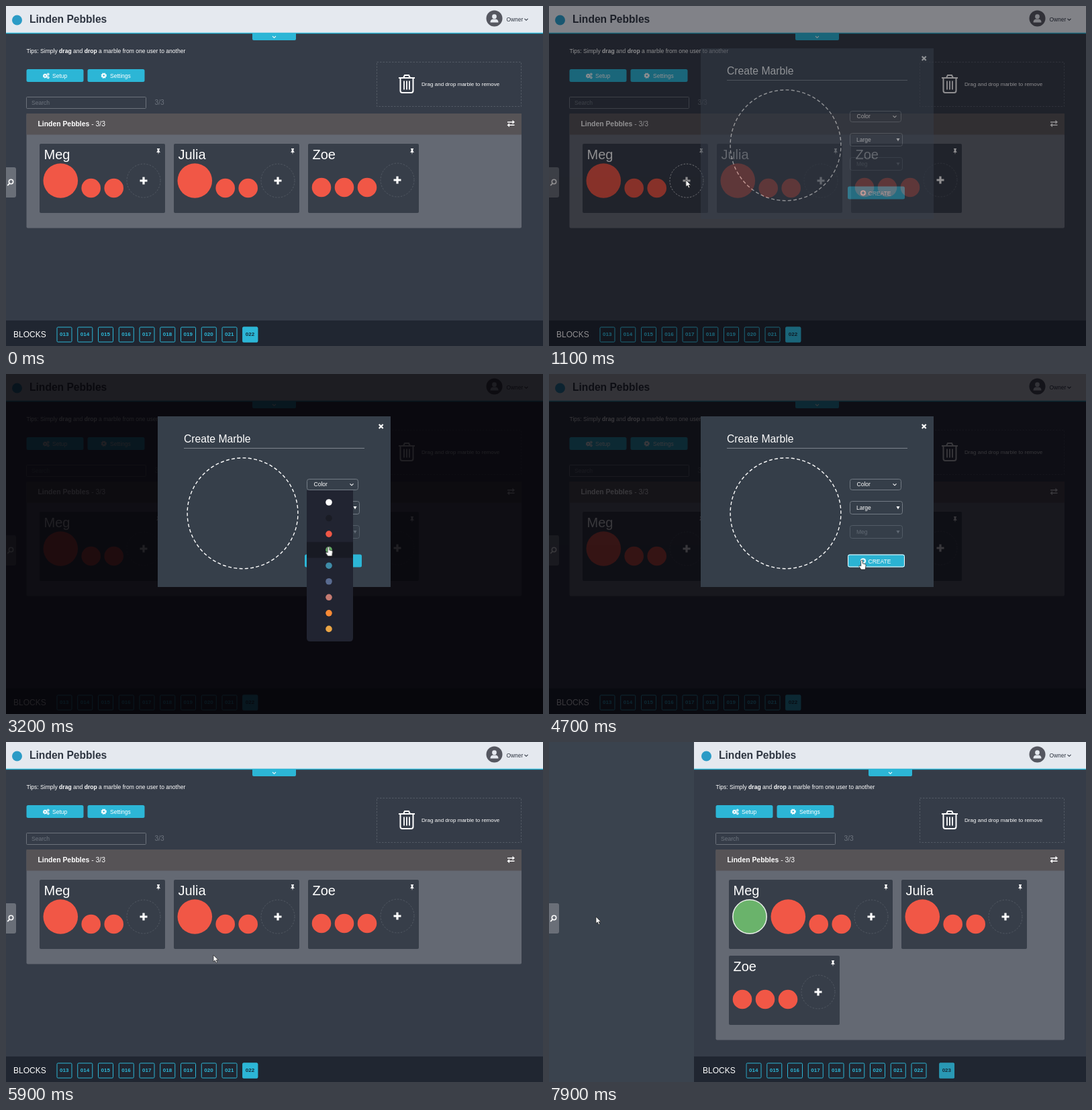
Animation of 800 by 506 pixels, one loop 8 s. Source, as an HTML page:

```html
<!DOCTYPE html>
<html lang="en">
<head>
<meta charset="utf-8">
<title>Marble trading</title>
<style>
  html, body { margin: 0; width: 100%; height: 100%; overflow: hidden; background: #353c48; }
  svg { display: block; width: 800px; height: 506px; }
  text { font-family: "Liberation Sans", Arial, sans-serif; white-space: pre; }
  .b { font-weight: bold; }
</style>
</head>
<body>
<svg id="stage" viewBox="0 0 800 506"></svg>
<script>
const LOOP = 8000, CYAN = '#2cb6d6', RED = '#f15746', GREEN = '#6ab36b';
const NAMES = ['Meg', 'Julia', 'Zoe'], TRADE = 'Linden Pebbles';
const PITCH = 30.75;

// Drawing helpers
const rect = (x, y, w, h, fill, more = '') =>
  `<rect x="${x}" y="${y}" width="${w}" height="${h}" fill="${fill}" ${more}/>`;
const frame = (x, y, w, h, color, more = '') =>
  rect(x + .5, y + .5, w - 1, h - 1, 'none', `stroke="${color}" ${more}`);
const disc = (x, y, r, fill, more = '') =>
  `<circle cx="${x}" cy="${y}" r="${r}" fill="${fill}" ${more}/>`;
const text = (x, y, s, size = 8.55, fill = '#fff', more = '') =>
  `<text x="${x}" y="${y}" font-size="${size}" fill="${fill}" ${more}>${s}</text>`;
const line = (d, color = '#fff', w = 1, more = '') =>
  `<path d="${d}" fill="none" stroke="${color}" stroke-width="${w}" ${more}/>`;
const shape = (d, fill = '#fff', more = '') => `<path d="${d}" fill="${fill}" ${more}/>`;
const group = (id, ...parts) => `<g id="${id}">${parts.join('')}</g>`;
const chevron = (x, y, color = '#fff') => line(`M${x - 2.5} ${y - 1.2}l2.5 2.5l2.5 -2.5`, color, 1.1);
const gear = (x, y, r) =>
  disc(x, y, r * .6, 'none', `stroke="#fff" stroke-width="${r * .55}"`) +
  disc(x, y, r * .9, 'none', `stroke="#fff" stroke-width="${r * .4}" stroke-dasharray="${r * .36}"`);

const pin = (x, y) => shape(`M${x - 2} ${y - 4.5}h4v1l-.7 .4v2.4l1.7 1.9h-2.4l-.6 3.4l-.6 -3.4h-2.4l1.7 -1.9v-2.4l-.7 -.4z`);
const adder = (x, y, id) =>
  disc(x, y, 25, 'none', `id="${id}" stroke="#525963" stroke-dasharray="2.5 2"`) +
  line(`M${x - 5.5} ${y}h11M${x} ${y - 5.5}v11`, '#fff', 3.2);

function card(i, x, w, marbles, plusY) {
  const id = 'card' + i;
  const discs = marbles.map(([dx, dy, r]) => disc(x + dx, dy, r, RED)).join('');
  return group(id,
    rect(x, 205, w, 103, '#373e49', `id="${id}back" rx="2"`),
    text(x + 6.5, 227.5, NAMES[i], 20),
    group(id + 'set', discs, adder(x + w - 32, plusY, id + 'add'), pin(x + w - 10, 216.5)));
}

const big = [31.3, 260, 25.8], pair = [[76.7, 271, 14.3], [110.7, 271, 14.3]];
const cards =
  card(0, 50, 187, [big, ...pair], 260) +
  card(1, 250, 187, [big, ...pair], 260) +
  card(2, 450, 165, [20, 54, 88].map(dx => [dx, 270, 14.3]), 259);

const trash = line('M585 107h24M592 107l2 -4h6l2 4M587.5 107v19q0 3 3 3h13q3 0 3 -3v-19', '#fff', 2) +
  line('M593 111.5v13M597 111.5v13M601 111.5v13', '#fff', 1.8);

const button = (x, y, label, tx, w = 85) =>
  rect(x, y, w, 19, CYAN, 'rx="2.5"') + text(tx, y + 13, label);

const block = (n, i) => {
  const x = 75.5 + i * PITCH, fresh = i > 8;
  return group('block' + n,
    frame(x, 477.5, 23, 23, CYAN, 'rx="1.5"'),
    text(x + 11.2, 491.3, '0' + n, 8, CYAN, 'class="b" text-anchor="middle"'),
    fresh ? group('hot' + n, rect(x, 477.5, 23, 23, CYAN, 'rx="1.5"'),
      text(x + 11.2, 491.3, '0' + n, 8, '#16303f', 'class="b" text-anchor="middle"')) : '');
};
const blocks = Array.from({ length: 11 }, (_, i) => block(13 + i, i)).join('');

const content = group('slideA',
  text(30.5, 70, 'Tips: Simply <tspan class="b">drag</tspan> and <tspan class="b">drop</tspan> a marble from one user to another'),
  button(30.5, 94, 'Setup', 69), gear(58.3, 104, 3.2), gear(62.8, 101.6, 1.9), gear(62.8, 106.4, 1.9),
  button(121.5, 94, 'Settings', 155), gear(145.7, 103.6, 3.9),
  frame(30, 135, 179, 18, '#6c727b', 'rx="1"'), text(38, 147.2, 'Search', 8.55, '#6d747e'),
  text(221.5, 147.2, '3/3', 10.2, '#6d747e'));

const EDGE = '#747c86';
const select = (y, h, label, on = true) =>
  frame(448, y, 79, h, on ? EDGE : '#535d68', 'rx="3"') +
  text(458, y + h / 2 + 3.2, label, 8.55, on ? '#fff' : '#626b76') +
  shape(`M517.5 ${y + h / 2 - 2}h5l-2.5 4.5z`, on ? '#fff' : '#626b76');

const swatches = ['#fff', '#1a1c25', RED, GREEN, '#3f8ca8', '#596b90', '#c57b72', '#f98a35', '#eba545'];
const menu = group('menu',
  shape('M448 173h69v220q0 5 -5 5h-59q-5 0 -5 -5z', '#212431'),
  rect(448, 179.5, 69, 23.5, '#181a23', 'id="band"'),
  ...swatches.map((c, i) => disc(481, 191 + i * 23.55, 4.8, c)));

const dialog = group('dialog',
  rect(226, 63, 347, 254, '#363f4a'),
  text(265, 102, 'Create Marble', 15.7),
  line('M265 110.5H534', '#7d848d'),
  line('M555.7 75l6 6m0 -6l-6 6', '#fff', 2.2),
  disc(352.5, 207.3, 82.5, GREEN, 'id="fill"'),
  disc(352.5, 207.3, 82.4, 'none',
    'stroke="#fff" stroke-width="1.4" pathLength="310" stroke-dasharray="3 2" transform="rotate(-90 352.5 207.3)"'),
  frame(448, 156, 77, 17, EDGE, 'rx="3"'), text(458.5, 167.3, 'Color'), chevron(515, 164.5),
  select(189, 20, 'Large'), select(225, 20, NAMES[0], false),
  button(445, 268.5, 'CREATE', 475.5),
  disc(468, 278.3, 4.1, '#fff'), line('M465.7 278.3h4.6M468 276v4.6', CYAN, 1.5),
  frame(445, 268.5, 85, 19, '#fff', 'id="focus" rx="2.5"'),
  menu);

const cursor = group('cursor',
  group('arrow', shape('M0 0V10L2.3 8L4 11.8L5.7 11L4.1 7.4H7.2Z', '#fff', 'stroke="#222" stroke-width=".7"')),
  group('hand', shape('M-1.3 .8Q0 -.9 1.3 .8V5L5.3 6Q6.3 6.4 6.1 8L5.2 14H-1.2L-4 9.4Q-4 7.5 -2.6 8L-1.3 9Z',
    '#fff', 'stroke="#222" stroke-width=".8"')));

document.getElementById('stage').innerHTML = [
  rect(0, 0, 800, 506, '#353c48'),
  content,
  rect(552.5, 83.5, 215, 66, 'none', 'stroke="#535a65" stroke-dasharray="2.5 2"'),
  trash, text(619, 119, 'Drag and drop marble to remove', 8.05),
  rect(30.5, 160, 737.5, 170.5, '#646973', 'id="panel" rx="2"'),
  rect(30.5, 160, 737.5, 31.5, '#565356', 'id="heading"'),
  group('slideB', text(47.5, 178.5, `<tspan class="b">${TRADE}</tspan> - 3/3`, 10.4),
    cards, group('newMarble', disc(81, 260, 25.2, GREEN, 'stroke="#e9efe9" stroke-width="1.5"'))),
  line('M747 172.8h8M749.5 177.2h8', '#fff', 1.6), shape('M754.5 169.8l3.5 3l-3.5 3zM750 174.2l-3.5 3l3.5 3z'),
  rect(0, 0, 800, 40, '#e5e9ef'), rect(0, 39.7, 800, 1.5, CYAN),
  group('slideC', disc(16.5, 21, 7.5, '#2b9bc6'), text(35, 25.3, TRADE, 15.6, '#2f3642', 'class="b"')),
  group('pull', shape('M367 41h65v8q0 2 -2 2h-61q-2 0 -2 -2z', CYAN), chevron(399.5, 46)),
  disc(727.5, 18.5, 12, '#555760'), disc(727.5, 15.7, 3.4, '#e5e9ef'),
  shape('M721.5 24.5q0 -4.5 4 -5h4q4 .5 4 5z', '#e5e9ef'),
  text(745.5, 22.7, 'Owner', 8.4, '#2f3642'), chevron(775, 20, '#2f3642'),
  rect(0, 468, 800, 38, '#202631'),
  group('slideD', text(11, 493, 'BLOCKS', 12), group('row', blocks)),
  rect(0, 0, 216, 506, '#3a434e', 'id="drawer"'),
  shape('M0 240h12q3 0 3 3v39q0 3 -3 3h-12z', '#6a6f78'),
  disc(7.5, 261.5, 3.2, 'none', 'stroke="#fff" stroke-width="1.5"'), line('M5.2 264.2l-3 3', '#fff', 1.8),
  group('shade', rect(0, 0, 800, 506, '#050408', 'opacity=".89"')),
  dialog, cursor
].join('');

// Motion: each step is [ms, css, easing to the next step]
function play(id, steps, ease = 'linear') {
  const all = [[0, steps[0][1]], ...steps, [LOOP, steps.at(-1)[1]]];
  document.getElementById(id).animate(
    all.map(([ms, css, e]) => ({ offset: ms / LOOP, easing: e || ease, ...css })),
    { duration: LOOP, iterations: Infinity });
}
const move = (x, y = 0) => ({ transform: `translate(${x}px, ${y}px)` });
const show = o => ({ opacity: o });
const jump = (id, ...steps) => play(id, steps, 'step-end');
const during = (id, from, to) => jump(id, [0, show(0)], [from, show(1)], [to, show(0)]);
const glide = (id, from, to) => play(id, [[7300, from], [7700, to]], 'ease-in-out');
const fade = (id, start, end) => play(id,
  [[start, show(0)], [start + 400, show(1)], [end, show(1)], [end + 400, show(0)]], 'ease-in-out');

// Create dialog: the shade starts to lift just before the dialog does
fade('shade', 900, 4610);
fade('dialog', 900, 4670);
jump('card0add', [0, { stroke: '#525963' }], [700, { stroke: '#c9ccd1' }], [1300, { stroke: '#525963' }]);
during('menu', 2400, 3500);
jump('band', [0, move(0)], [2640, move(0, 23.5)], [2800, move(0, 47)], [2950, move(0, 70.6)]);
during('fill', 3500, 4620);
during('focus', 4600, 5100);

// Side drawer pushes the page to the right
for (const id of ['slideA', 'slideB', 'slideC', 'slideD']) glide(id, move(0), move(218));
glide('pull', move(0), move(109));
glide('drawer', move(-216), move(0));
for (const id of ['heading', 'panel'])
  glide(id, { x: '30.5px', width: '737.5px' }, { x: '248.5px', width: '519.5px' });
jump('panel', [0, { height: '170.5px' }], [7530, { height: '283.5px' }]);
jump('card2', [0, move(0)], [7530, move(-400, 113)]);

// New marble and block arrive
const BORN = 7700;
jump('newMarble', [0, show(0)], [BORN, show(1)]);
jump('card0back', [0, { width: '187px' }], [BORN, { width: '244px' }]);
jump('card0set', [0, move(0)], [BORN, move(57)]);
jump('card1', [0, move(0)], [BORN, move(57)]);
jump('row', [0, move(0)], [BORN, move(-PITCH)]);
jump('block13', [0, show(1)], [BORN, show(0)]);
jump('hot22', [0, show(1)], [BORN, show(0)]);
play('block23', [[BORN, { ...move(40), ...show(0) }], [7900, { ...move(11), ...show(.8) }], [LOOP, { ...move(0), ...show(1) }]]);

// Pointer
play('cursor', [
  [200, move(330, 400)], [750, move(204, 259)], [1200, move(204, 259)], [1600, move(435, 184)],
  [2050, move(512, 163)], [2400, move(512, 166), 'linear'], [3000, move(480.5, 257)], [3550, move(480.5, 257)],
  [4250, move(466, 277)], [4800, move(466, 277)], [5900, move(309, 317)], [6300, move(300, 315)],
  [7050, move(8, 261)], [7400, move(8, 261)], [7900, move(70, 260)]
], 'ease-in-out');
jump('arrow', [0, show(0)], [200, show(1)], [2450, show(0)], [3700, show(1)], [4150, show(0)],
  [4900, show(1)], [7000, show(0)], [7450, show(1)]);
jump('hand', [0, show(0)], [2450, show(1)], [3700, show(0)], [4150, show(1)], [4900, show(0)],
  [7000, show(1)], [7450, show(0)]);
</script>
</body>
</html>
```
